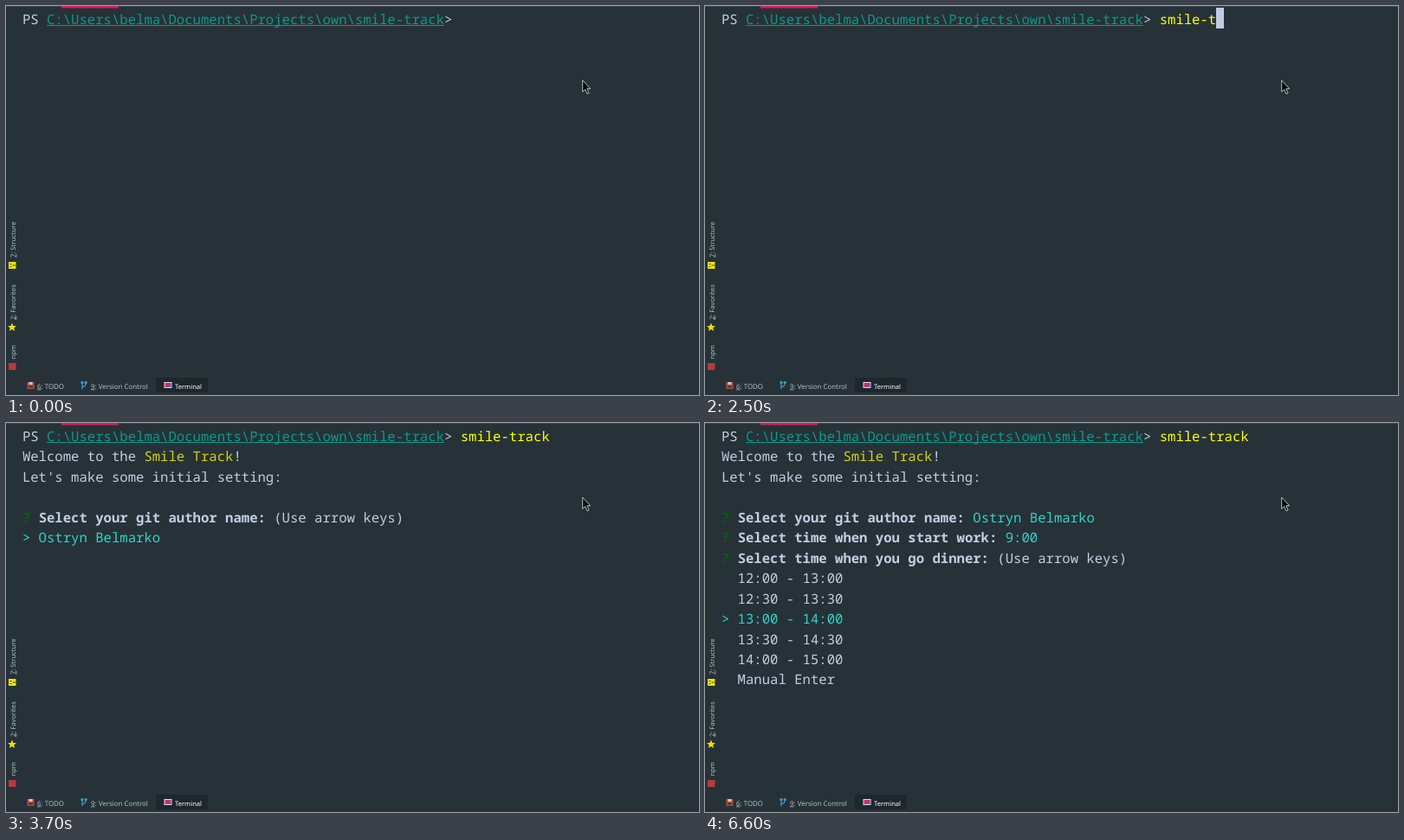
An HTML page that plays this animation: 800x450 px, repeating every 8000 ms.

```html
<!DOCTYPE html>
<html lang="en">
<head>
<meta charset="utf-8">
<title>Terminal session</title>
<style>
  html, body { margin: 0; width: 100%; height: 100%; overflow: hidden; background: #263238; }
  svg, pre, #caret { position: absolute; }
  svg { left: 0; top: 0; font-family: "Noto Sans", sans-serif; fill: #b3bdc4; }
  svg, pre { text-rendering: geometricPrecision; }
  svg .key { text-decoration: underline; }
  pre { left: 18.9px; top: 4px; margin: 0; color: #c3cee3;
        font: 500 15.62px/23.45px "Noto Sans Mono", monospace; font-variant-ligatures: none; }
  .path { color: #0a9a8a; text-decoration: underline 1px; text-underline-offset: 1px; text-decoration-skip-ink: none; }
  .command { color: #ffff00; }
  .title { color: #d2d012; }
  .mark { color: #0b5c12; font-weight: bold; }
  .pick { color: #32d3c8; }
  #caret { width: 9.4px; height: 23.4px; background: #c3cbe4; }
</style>
</head>
<body>
<svg width="800" height="450" viewBox="0 0 800 450">
  <path d="M0 0H800V1H0Z" fill="#37474f"/>
  <path d="M64 0H130V2.5H64Z" fill="#d81b60"/>
  <path d="M173 430H233V447H173Z" fill="#1e272c"/>

  <g font-size="7.6">
    <text transform="translate(10.5 291) rotate(-90)"><tspan class="key">7</tspan>: Structure</text>
    <text transform="translate(10.5 363) rotate(-90)"><tspan class="key">2</tspan>: Favorites</text>
    <text transform="translate(10.5 408.5) rotate(-90)">npm</text>
  </g>
  <g font-size="7.9">
    <text x="36" y="442.5"><tspan class="key">6</tspan>: TODO</text>
    <text x="98" y="442.5"><tspan class="key">9</tspan>: Version Control</text>
    <text x="195" y="442.5" font-size="7.6" fill="#fff">Terminal</text>
  </g>

  <path d="M3 296H11.5V304H3Z" fill="#f0e10a"/>
  <path d="M4.5 298.5H6.5M4.5 301.5H6.5M7.5 300H11.5" stroke="#263238" stroke-width=".8"/>
  <path d="M7 366.5 8.4 370 12 370.2 9.2 372.5 10.2 376 7 374 3.8 376 4.8 372.5 2 370.2 5.6 370Z" fill="#f5dc10"/>
  <path d="M3 413H11.5V421H3Z" fill="#b93a3d"/>

  <path d="M24.5 435H32.5V443H24.5Z" fill="#b5483f"/>
  <path d="M26.5 435H30.5V438H26.5Z" fill="#d5c8c6"/>
  <path d="M26 440.5H31" stroke="#263238" stroke-width="1.6"/>
  <g fill="none" stroke="#3fa3d8" stroke-width="1.2">
    <path d="M88 436V443M88 440.5Q92.2 440.5 92.2 436"/>
    <path d="M86.5 435.5H89.5M90.8 435.5H93.6" stroke-width="2.4"/>
  </g>
  <path d="M182.5 435H191.5V442H182.5Z" fill="#d7dfea"/>
  <path d="M183.5 436H190.5V441H183.5Z" fill="#e0245e"/>
  <path d="M186 441 190.5 436.5V441Z" fill="#3a6fd0"/>

  <path d="M665.7 86V99.2L668.7 96.5 671 101.7 673 100.8 670.8 95.7H674.7Z"
        fill="#000" stroke="#e4e8ea" stroke-width=".8"/>
</svg>
<pre id="screen"></pre>
<div id="caret"></div>

<script>
const LOOP = 8000;
const CELL = 9.37, LINE = 23.45;
const COMMAND = 'smile-track';
const KEY_TIMES = [1500, 1700, 1900, 2000, 2200, 2300, 2500, 2700, 2800, 2900, 3000];
const AUTHOR = 'Ostryn Belmarko';
const COMMAND_COLUMN = 54;

const screenEl = document.getElementById('screen');
const caretEl = document.getElementById('caret');

const span = (style, text) => `<span class="${style}">${text}</span>`;
const ask = (question, reply) => `${span('mark', '?')} <b>${question}:</b> ${reply}`;
const menu = (items, chosen) => items.map((item, i) =>
  i === chosen ? span('pick', '&gt; ' + item) : '  ' + item);

const hint = '(Use arrow keys)';
const prompt = `PS ${span('path', 'C:\\Users\\belma\\Documents\\Projects\\own\\' + COMMAND)}&gt; `;
const intro = [`Welcome to the ${span('title', 'Smile Track')}!`, "Let's make some initial setting:", ''];
const author = reply => ask('Select your git author name', reply);
const start = reply => ask('Select time when you start work', reply);
const dinner = reply => ask('Select time when you go dinner', reply);
const hours = [7, 8, 9, 10, 11, 12, 13].map(h => h + ':00');
const breaks = ['12:00 - 13:00', '12:30 - 13:30', '13:00 - 14:00', '13:30 - 14:30', '14:00 - 15:00', 'Manual Enter'];

function output(t) {
  if (t < 3500) return [];
  if (t < 3700) return intro;
  if (t < 4900) return [...intro, author(hint), ...menu([AUTHOR], 0)];
  const named = [...intro, author(span('pick', AUTHOR))];
  if (t < 6500) return [...named, start(hint), ...menu(hours, 2), '(Move up and down to reveal more choices)'];
  return [...named, start(span('pick', '9:00')), dinner(hint), ...menu(breaks, 2)];
}

function caretCell(t, typed) {
  if (t < KEY_TIMES[0] || t >= 3700) return null;
  if (t < 3200) return [COMMAND_COLUMN + typed, 0];
  return [0, t < 3500 ? 1 : 4];
}

let shown;
function draw(now) {
  const t = now % LOOP;
  const typed = KEY_TIMES.filter(time => time <= t).length;
  const html = [prompt + span('command', COMMAND.slice(0, typed)), ...output(t)].join('\n');
  if (html !== shown) screenEl.innerHTML = shown = html;

  const cell = caretCell(t, typed);
  caretEl.hidden = !cell;
  if (cell) {
    caretEl.style.left = 18.2 + cell[0] * CELL + 'px';
    caretEl.style.top = 2.4 + cell[1] * LINE + 'px';
  }
  requestAnimationFrame(draw);
}
draw(performance.now());
</script>
</body>
</html>
```
